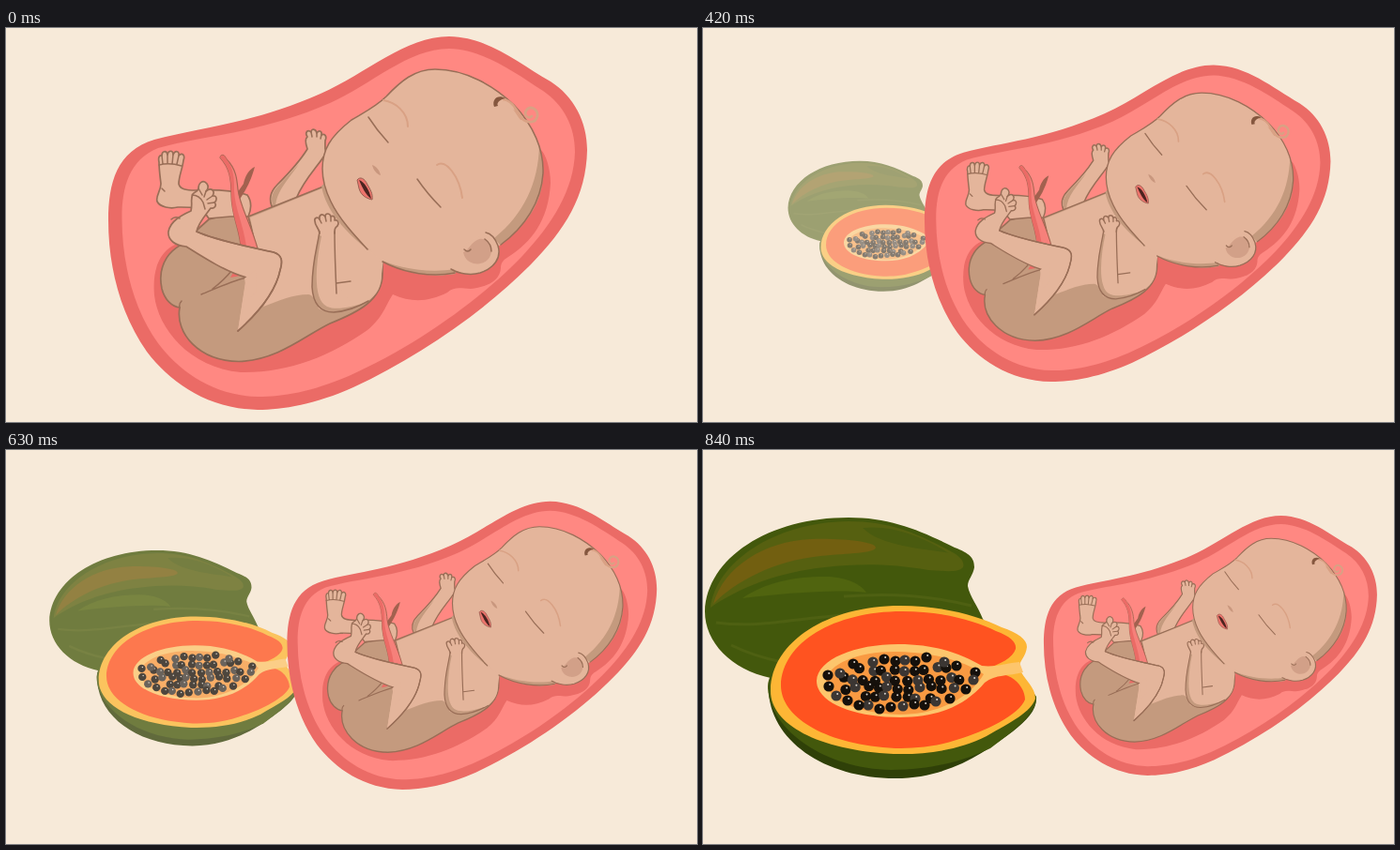
These frames come from a looping animation (736 px wide and 420 px high, 0.91 s). An HTML page:

```html
<!DOCTYPE html>
<html lang="en">
<head>
<meta charset="utf-8">
<title>Growth</title>
<style>
  html, body { margin: 0; width: 100%; height: 100%; overflow: hidden; background: #f7ead9; }
  svg { display: block; width: 100%; height: 100%; }
  .skin { fill: #e4b59b; }
  .shade { fill: #c49a7e; }
  .red { fill: #eb6b66; }
  .edge { stroke: #996e57; stroke-width: 1.7; stroke-linejoin: round; stroke-linecap: round; }
  .line { fill: none; stroke: #996e57; stroke-width: 1.5; stroke-linecap: round; }
  .soft { fill: none; stroke: #d9a184; stroke-linecap: round; }
</style>
</head>
<body>
<svg viewBox="0 0 736 420">
  <g id="fruit" opacity="0">
    <!-- whole fruit -->
    <path fill="#43580c" d="M2 172C4 115 70 72 155 72C200 72 232 86 268 104C284 110 289 115 289 125C288 133 282 138 282 145C284 156 293 167 298 180L240 240L72 243C30 234 2 205 2 172Z"/>
    <path fill="#566010" d="M8 168C14 120 75 77 155 76C200 76 228 89 262 107C274 113 279 119 277 125C272 131 258 129 240 128C200 121 165 121 130 125C80 130 38 147 8 168Z"/>
    <path fill="#4a5b0f" d="M170 83C205 79 240 96 262 110C245 106 190 104 170 83Z"/>
    <path fill="#725f10" d="M11 164C22 125 65 97 115 95C150 94 184 98 184 104C183 110 155 110 125 113C75 118 35 140 11 164Z"/>
    <path fill="#50640f" d="M42 158C65 142 95 135 130 135C150 135 168 142 174 152C140 148 85 153 42 158Z"/>
    <path fill="none" stroke="#4e6012" stroke-width="3" d="M14 184C60 190 95 180 150 176M30 208C50 218 65 222 84 226M150 156C205 152 245 156 286 166"/>
    <!-- cut half -->
    <path fill="#2f4008" d="M70 246C65 305 125 350 205 350C262 350 300 322 330 300C345 288 356 277 355 263L300 230Z"/>
    <path fill="#43580c" d="M69 252C70 298 130 340 200 341C250 341 285 328 306 318C335 296 356 280 355 263L298 180L110 200C85 215 70 235 69 252Z"/>
    <path fill="#fdb635" d="M72 257C72 205 132 166 210 166C254 166 292 176 318 189C336 195 345 202 345 210C344 220 337 225 337 231C339 243 354 251 354 265C350 279 328 290 302 305C272 320 238 325 203 324C122 320 72 292 72 257Z"/>
    <path fill="#ff5320" d="M83 251C84 205 140 172 212 172C256 172 290 182 312 193C328 199 334 205 333 212C330 222 316 228 303 233L316 239C334 240 343 256 343 266C337 282 301 300 270 309C247 317 224 318 205 318C130 314 83 285 83 251Z"/>
    <path fill="#fdc56c" d="M121 246C122 223 162 207 208 207C250 207 276 218 297 230C311 232 324 227 337 226L341 237C325 241 312 239 300 248C278 274 248 285 210 285C162 285 121 270 121 246Z"/>
    <path fill="#f99a42" d="M131 246C133 227 168 214 208 215C250 216 280 226 299 239C285 263 252 282 210 282C165 281 132 267 131 246Z"/>
    <g id="seeds"></g>
  </g>

  <g id="womb">
    <path class="red" d="M109 205C109 165 118 131 158 119C205 106 260 103 335 70C385 48 425 9 472 9C515 10 545 37 580 57C605 73 619 100 619 130C618 180 595 215 560 251C510 302 440 350 370 383C330 401 295 407 268 407C215 406 175 378 150 345C122 305 109 255 109 205Z"/>
    <path fill="#ff8882" d="M123.500 205C123 172 130 141 162 128C205 115 270 113 345 80C390 60 428 22 472 22C508 23 540 46 572 67C594 82 606 105 606 132C605 172 582 209 550 243C505 290 435 340 365 371C325 388 295 393 268 393C222 392 185 367 162 336C136 300 124 252 123.500 205Z"/>
    <path class="red" d="M200 226C168 228 155 250 158 285C162 320 195 362 250 367C300 368 345 350 385 322C402 308 404 296 412 284C432 293 450 292 470 282C478 275 485 278 495 278C512 276 526 270 527 256C527 250 530 247 535 244C560 228 578 205 580 165C580 150 575 135 570 130Z"/>

    <!-- far arm -->
    <path class="skin edge" d="M284 192C280 184 281 175 289 167C302 154 313 142 321 129C319 123 318 118 321 116C318 112 321 107 325 111C325 107 330 107 331 112C333 108 337 110 336 114C340 112 342 116 340 120C340 124 339 128 341 133C333 147 318 160 309 182L304 194Z"/>
    <path class="shade" d="M285 191C281 182 283 175 291 167L312 145C302 160 288 173 287 191Z"/>
    <path class="line" d="M325 111L326 116M331 112L331 116M336 114L335 118"/>

    <!-- far leg -->
    <path class="shade edge" d="M240 198L216 204L196 222L250 236L256 200Z"/>
    <path class="skin edge" d="M183 191C175 193 164 191 161 185C159 179 165 174 165 166C164 157 163 151 163 143C162 139 163 135 166 136C166 131 171 130 172 135C173 130 178 130 178 135C180 130 185 131 184 136C188 132 191 136 189 141C188 150 184 158 184 166C185 172 192 173 202 173C224 172 245 174 257 178C262 185 261 194 258 201L239 201L216 203C208 190 196 191 183 191Z"/>
    <path class="line" d="M166 136L167 145M172 135L172 145M178 135L177 145M184 136L182 145M163 146Q174 143 187 147M166 171L169 174"/>

    <!-- torso -->
    <path class="shade edge" d="M338 169L258 201L268 235L205 226C172 230 161 255 166 278C169 290 177 297 185 298C180 325 205 355 248 355.500C290 354 318 328 345 315C375 303 401 290 401 262V248L385 236Z"/>
    <path class="skin" d="M339 170L260 202L268 240L293 245C290 265 283 282 274 297C290 291 305 284 322 284C326 284 330 290 333 299C340 304 360 303 384 292C396 284 400 275 400 262L402 247L385 234Z"/>
    <path class="line" d="M185 298Q184 294 187 291M208 284C225 277 240 270 256 266M220 278Q232 269 240 259"/>
    <path class="red" d="M239 266L243 259L250 264Z"/>

    <!-- cord -->
    <path fill="#a2614f" d="M265 148C258 151 254 160 253 166L246 176L248 184C254 175 260 166 265 148Z"/>
    <path fill="#f6807a" stroke="#a56552" stroke-width="1.200" d="M228 138C230 133 233 136 235 140C245 150 246 161 247 172C249 190 261 209 268 235L250 232C248 212 240 199 240 178C240 160 238 149 228 138Z"/>
    <path class="red" d="M228 138C230 133 233 136 235 140C243 150 243 162 243 174C244 193 253 210 256 233L250 232C248 212 240 199 240 178C240 160 238 149 228 138Z"/>

    <!-- near leg -->
    <path class="skin" d="M247 323Q270 292 256 264Z"/>
    <path class="skin edge" d="M256 266C232 259 208 243 192 233C180 232 172 226 173 217C175 206 186 200 197 195C199 186 196 183 199 177C201 174 204 175 205 171C205 165 210 161 214 166C216 169 215 172 213 174C219 169 223 174 220 179C225 178 225 184 222 186C225 189 222 193 218 192C213 199 205 207 203 217C225 227 262 234 285 239C294 242 295 248 292 258C288 278 275 298 247 323"/>
    <path class="skin" d="M254 267L266 258L267 280L258 290Z"/>
    <path class="line" d="M205 171L209 178M213 174L211 180M220 179L214 183M222 186L215 187M198 178Q206 178 210 186L212 193M176 204Q180 200 185 203"/>
    <path class="line" stroke-width="2.500" d="M203 217C225 227 262 234 285 239C294 242 295 248 292 258C288 278 275 298 247 323"/>

    <!-- near arm -->
    <path class="skin" d="M333 217C331 236 326 250 326 276C327 294 335 303 349 303L370 297L353 272L352 214Z"/>
    <path class="shade" d="M333 220C331 236 326 250 326 276C327 294 335 303 349 303C362 302 372 299 385 292C366 298 352 301 342 297C326 290 330 250 336 222Z"/>
    <path class="skin edge" d="M334 219C334 214 329 211 329 206C328 202 332 201 334 204C333 199 337 197 340 201C340 197 345 197 346 201C349 199 351 202 350 205C354 204 355 208 353 211C350 213 350 215 350 219"/>
    <path class="line" d="M334 217C331 236 326 250 326 276C327 294 335 303 349 303C362 302 374 298 386 291M350 217C350 240 351 260 352 283M352 272L367 270M334 204L336 208M340 201L341 206M346 201L346 206"/>

    <!-- head -->
    <path class="shade" d="M336 168C339 188 354 212 385 236L396 238L348 160Z"/>
    <path class="skin" d="M337 150C337 130 345 116 368 98C385 88 395 83 405 73C420 57 435 44 457 44C490 44 520 62 541 82C562 104 573 130 572 155C570 185 553 212 527 231L476 262C455 266 425 262 401 249C390 240 360 212 346 185C340 173 337 160 337 150Z"/>
    <path class="shade" d="M568 125C567 165 552 198 520 224L526 231C555 211 572 185 572 155C572 145 571 135 568 125ZM401 248C425 258 455 261 478 257L479 262C455 266 425 262 401 249Z"/>
    <path class="line" d="M385 236C372 222 355 204 346 185C340 173 337 160 337 150C337 130 345 116 368 98C385 88 395 83 405 73C420 57 435 44 457 44C490 44 520 62 541 82C562 104 573 130 572 155C570 185 553 212 527 231M401 249C425 262 455 266 478 261"/>

    <!-- ear -->
    <path class="skin" d="M474 255C482 262 495 264 505 261C520 256 528 245 524 232C521 224 516 219 511 218L489 230Z"/>
    <path class="line" d="M474 257C482 262 495 264 505 261C520 256 528 245 524 232C521 224 516 219 511 218"/>
    <path fill="#d2a088" d="M487 239C493 237 495 228 504 225C512 223 518 231 517 239C515 249 506 253 498 251C491 249 488 244 487 239Z"/>
    <path class="line" stroke-width="1" d="M488 236Q492 240 495 236M510 225Q517 230 517 238"/>

    <!-- face -->
    <path class="soft" stroke-width="2" d="M402 77C415 79 428 90 428 105M459 146C468 139 483 158 486 181"/>
    <path class="line" d="M386 95Q395 109 407 122M438 161Q449 177 463 191"/>
    <path fill="#c9977e" d="M390 146C391 151 395 156 399 157C398 152 395 148 390 146Z"/>
    <path fill="#ed746c" stroke="#996052" stroke-width="1" d="M374 162C377 158 382 160 385 167C388 172 391 177 390 183C385 182 378 179 376 171Z"/>
    <path fill="#4b2420" d="M376 162C382 164 387 173 389 182C383 178 379 169 376 162Z"/>

    <!-- hair -->
    <path class="soft" stroke-width="4" d="M531 77C539 79 543 88 549 96"/>
    <path class="skin" d="M528 77Q538 78 542 88L534 84Z"/>
    <path class="soft" stroke-width="2.800" d="M546 92C552 102 564 103 566 94C567 86 558 82 554 88C551 94 557 97 560 94"/>
    <path fill="#85573f" d="M520 84C517 76 524 70 532 75C526 76 522 80 524 83Z"/>
  </g>
</svg>
<script>
  const STEP = 70, COUNT = 13;
  const fruit = document.getElementById('fruit');
  const womb = document.getElementById('womb');

  // Seeds: a hand-placed rim around loosely packed rows.
  const rim = [
    [160, 228], [181, 226], [193, 223], [205, 225], [215, 224], [226, 225], [238, 221], [257, 226],
    [270, 230], [290, 237], [288, 245], [280, 255], [263, 265], [248, 268], [236, 272], [225, 271],
    [213, 273], [200, 274], [188, 276], [176, 272], [166, 272], [154, 267], [142, 262], [134, 252],
    [133, 240], [146, 238]
  ];
  let seed = 17;
  const rand = () => (seed = seed * 16807 % 2147483647) / 2147483647;

  function seedMark([x, y], i) {
    const tone = i % 3 === 1 ? '#3b3633' : '#15100b';
    return `<circle cx="${x}" cy="${y}" r="5.600" fill="${tone}"/>` +
      `<circle cx="${x + 1.2}" cy="${y - 2}" r="1" fill="#d8d3cc"/>`;
  }

  const inner = [];
  [[169, 234, 9], [150, 244, 12], [153, 254, 11], [172, 263, 7]].forEach(([x, y, n]) => {
    for (let i = 0; i < n; i++) {
      inner.push([x + i * 11.3 + rand() * 5 - 2.5, y + rand() * 5 - 2.5]);
    }
  });
  document.getElementById('seeds').innerHTML = [...inner, ...rim].map(seedMark).join('');

  function draw() {
    const p = Math.floor(performance.now() % (STEP * COUNT) / STEP) / (COUNT - 1);
    womb.setAttribute('transform', `translate(${287.1 * p} ${63.7 * p}) scale(${1 - 0.304 * p})`);
    fruit.setAttribute('transform', `translate(179 211.500) scale(${p}) translate(-179 -211.500)`);
    fruit.setAttribute('opacity', p);
    requestAnimationFrame(draw);
  }
  draw();
</script>
</body>
</html>
```
